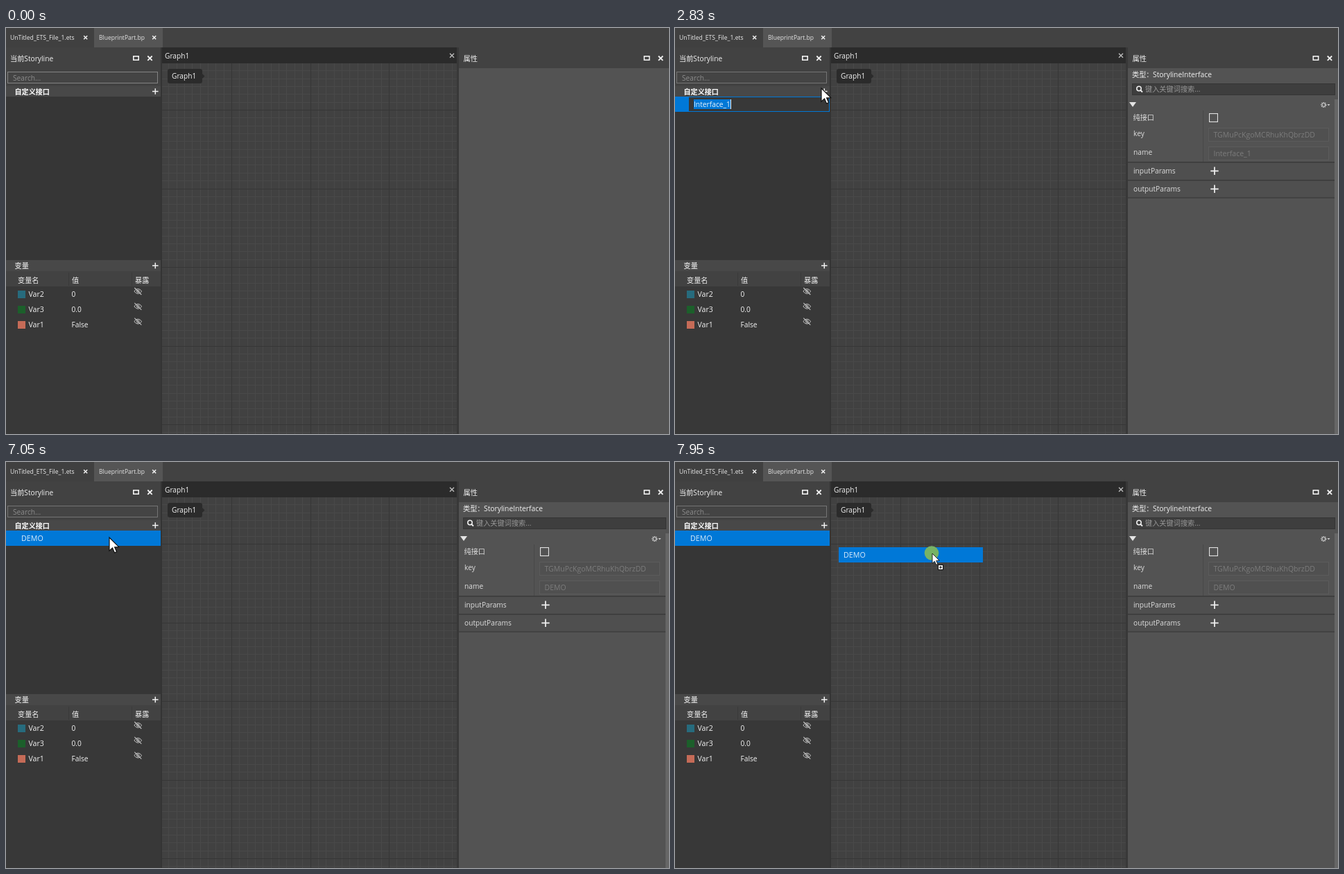
Animation of 956x586 px, one loop 8000 ms. Source, as an HTML page with a canvas:

```html
<!DOCTYPE html>
<html lang="zh">
<head>
<meta charset="utf-8">
<title>Interface editor</title>
<style>
html, body { margin: 0; width: 100%; height: 100%; overflow: hidden; background: #404040; }
canvas { display: block; width: 956px; height: 586px; }
</style>
</head>
<body>
<canvas id="stage" width="956" height="586"></canvas>
<script>
const ctx = document.getElementById('stage').getContext('2d');
const FAMILY = '"Open Sans", "Noto Sans CJK SC", "Noto Sans CJK", sans-serif';
const LOOP = 8000, STEP = 70;
const BLUE = '#0078d7', WHITE = '#f2f2f2';

function box(x, y, w, h, color) {
  ctx.fillStyle = color;
  ctx.fillRect(x, y, w, h);
}

function frame(x, y, w, h, color, line = 1) {
  ctx.strokeStyle = color;
  ctx.lineWidth = line;
  ctx.strokeRect(x + line / 2, y + line / 2, w - line, h - line);
}

function text(str, x, y, color = WHITE, size = 10.2, weight = 400) {
  ctx.font = `${weight} ${size}px ${FAMILY}`;
  ctx.fillStyle = color;
  ctx.fillText(str, x, y);
}

function lines(color, width, ...segments) {
  ctx.strokeStyle = color;
  ctx.lineWidth = width;
  ctx.beginPath();
  for (const [x1, y1, x2, y2] of segments) {
    ctx.moveTo(x1, y1);
    ctx.lineTo(x2, y2);
  }
  ctx.stroke();
}

function shape(points, color) {
  ctx.beginPath();
  points.forEach(([x, y]) => ctx.lineTo(x, y));
  ctx.closePath();
  ctx.fillStyle = color;
  ctx.fill();
}

function disc(x, y, r, color) {
  ctx.beginPath();
  ctx.arc(x, y, r, 0, Math.PI * 2);
  ctx.fillStyle = color;
  ctx.fill();
}

function cross(x, y, r, color = WHITE, width = 1.8) {
  lines(color, width, [x - r, y - r, x + r, y + r], [x - r, y + r, x + r, y - r]);
}

function plus(x, y, r, width = 1.5) {
  lines(WHITE, width, [x - r, y, x + r, y], [x, y - r, x, y + r]);
}

function windowButtons(x) {
  frame(x, 40, 9, 7, WHITE, 1.6);
  cross(x + 24.5, 43.7, 3.2);
}

function hiddenEye(x, y) {
  ctx.strokeStyle = '#c4c4c4';
  ctx.lineWidth = 1;
  ctx.beginPath();
  ctx.moveTo(x - 5.5, y);
  ctx.quadraticCurveTo(x, y - 7, x + 5.5, y);
  ctx.quadraticCurveTo(x, y + 7, x - 5.5, y);
  ctx.stroke();
  ctx.beginPath();
  ctx.arc(x, y, 1.8, 0, Math.PI * 2);
  ctx.stroke();
  lines('#c4c4c4', 1.1, [x - 5, y - 5, x + 5, y + 5]);
}

function drawTabs() {
  box(0, 0, 956, 586, '#424242');
  box(0, 0, 127, 28, '#404040');
  box(127, 0, 99, 28, '#555555');
  text('UnTitled_ETS_File_1.ets', 6, 17, '#ececec', 8.65);
  text('BlueprintPart.bp', 134, 17, '#e4e4e4', 8.55);
  cross(114.7, 13.7, 2.5, WHITE, 1.5);
  cross(213.7, 13.7, 2.5, WHITE, 1.5);
}

function drawLeft(focused) {
  box(0, 28, 223, 56, '#424242');
  text('当前Storyline', 6, 48, WHITE, 10.2);
  windowButtons(183);
  box(2, 63, 217, 17, '#444444');
  frame(2, 63, 217, 17, focused ? '#848484' : '#747474');
  text('Search...', 10, 75.5, '#8c8c8c');

  box(0, 84, 223, 15, '#484848');
  text('自定义接口', 12.5, 95.5, '#ffffff', 10.1, 700);
  plus(215.3, 91.5, 4.3);
  box(0, 99, 223, 236, '#363636');

  box(0, 335, 223, 16, '#484848');
  text('变量', 12.5, 347, '#ffffff', 10.2, 500);
  plus(215.3, 343, 4.3);
  box(0, 351, 223, 22, '#424242');
  box(90, 353, 1, 19, '#3a3a3a');
  box(181, 353, 1, 19, '#3a3a3a');
  text('变量名', 17, 368);
  text('值', 95, 368);
  text('暴露', 186, 368);
  box(0, 373, 223, 213, '#383838');
  const vars = [['Var2', '0', '#276b7d'], ['Var3', '0.0', '#1c5f2b'], ['Var1', 'False', '#c56b57']];
  vars.forEach(([name, value, color], i) => {
    const y = 384.3 + i * 21.8;
    box(17, Math.round(y) - 5, 11, 11, color);
    text(name, 32.5, y + 4, WHITE, 10.6);
    text(value, 94.5, y + 4);
    hiddenEye(190.3, y - 4.3);
  });
  box(223, 28, 2, 558, '#343434');
}

function drawGraph() {
  box(225, 28, 426, 23, '#2b2b2b');
  text('Graph1', 229, 44);
  cross(643, 39.7, 3, '#bdbdbd', 1.4);
  box(225, 51, 426, 535, '#414141');

  const cell = 11.35, first = [325.5, 118.5];
  for (const major of [false, true]) {
    const color = major ? '#363636' : '#494949';
    for (let i = -9; i < 42; i++) {
      if ((i % 10 === 0) !== major) continue;
      const x = Math.floor(first[0] + i * cell), y = Math.floor(first[1] + i * cell);
      if (x > 225 && x < 651) box(x, 51, 1, 535, color);
      if (y > 51 && y < 586) box(225, y, 426, 1, color);
    }
  }

  ctx.beginPath();
  ctx.roundRect(233, 59, 50, 21, 3);
  ctx.fillStyle = '#2b2b2b';
  ctx.fill();
  shape([[283, 66], [286.5, 69.5], [283, 73]], '#2b2b2b');
  text('Graph1', 239, 73);
  box(650, 28, 3, 558, '#383838');
}

function drawRight() {
  box(653, 28, 303, 30, '#424242');
  text('属性', 659.5, 48);
  windowButtons(919.5);
  box(653, 58, 303, 528, '#535353');
}

function field(y, value) {
  box(769, y, 174, 20, '#505050');
  frame(769, y, 174, 20, '#5b5b5b');
  text(value, 776.5, y + 14, '#7c7c7c', 10.5);
}

function drawProperties(name) {
  text('类型：', 659, 70.5);
  text('StorylineInterface', 689, 70.5, WHITE, 10.3);

  box(659, 80, 293, 17, '#3e3e3e');
  frame(659, 80, 293, 17, '#353535');
  ctx.strokeStyle = WHITE;
  ctx.lineWidth = 1.5;
  ctx.beginPath();
  ctx.arc(669, 87.5, 3.2, 0, Math.PI * 2);
  ctx.stroke();
  lines(WHITE, 1.8, [671.3, 89.8, 674, 92.5]);
  text('键入关键词搜索...', 678, 92.3, '#979797');

  shape([[655, 107], [665, 107], [660, 114]], '#e4e4e4');
  ctx.setLineDash([1.4, 1.1]);
  ctx.strokeStyle = '#d0d0d0';
  ctx.lineWidth = 1.4;
  ctx.beginPath();
  ctx.arc(935.3, 111, 3.4, 0, Math.PI * 2);
  ctx.stroke();
  ctx.setLineDash([]);
  ctx.lineWidth = 1;
  ctx.beginPath();
  ctx.arc(935.3, 111, 2.3, 0, Math.PI * 2);
  ctx.stroke();
  shape([[940.5, 110], [944.5, 110], [942.5, 112.3]], '#d0d0d0');

  box(761, 119, 1, 74, '#484848');
  text('纯接口', 660.5, 133, '#dddddd');
  text('key', 661, 156, '#dddddd');
  text('name', 661, 183, '#dddddd');
  frame(770, 123, 13, 13, '#e0e0e0', 1.1);
  field(144, 'TGMuPcKgoMCRhuKhQbrzDD');
  field(171, name);

  ['inputParams', 'outputParams'].forEach((label, i) => {
    const y = 193 + i * 26;
    box(653, y, 298, 26, '#4f4f4f');
    box(653, y, 298, 1.5, '#3a3a3a');
    text(label, 661, y + 16.5, '#dddddd');
    plus(778, y + 13.3, 5.7, 1.7);
  });
  box(653, 244.5, 298, 1.2, '#3a3a3a');
  box(951, 103, 5, 483, '#666666');
}

function typed(t) {
  const keys = [3300, 3500, 3700, 3770];
  return 'DEMO'.slice(0, keys.filter(k => t >= k).length);
}

function drawRow(t) {
  box(0, 99, 223, 22, BLUE);
  if (t >= 4170) {
    text('DEMO', 22, 114, '#d9ebfa', 10.7);
    return;
  }
  box(20, 100, 202, 20, '#383838');
  const entry = typed(t);
  if (entry) {
    text(entry, 27, 114, WHITE, 10.7);
    box(28 + Math.floor(ctx.measureText(entry).width), 103, 1, 14, WHITE);
  } else {
    box(27, 103, 53, 14, BLUE);
    text('Interface_1', 27, 114, '#e8f3fc', 10.25);
    if (t < 2300 || t >= 2830) box(80, 103, 1, 14, WHITE);
  }
}

function arrow(x, y, scale) {
  ctx.save();
  ctx.translate(x, y);
  ctx.scale(scale, scale);
  ctx.beginPath();
  [[0, 0], [0, 16.3], [3.8, 12.8], [6.4, 18.6], [9, 17.5], [6.5, 11.8], [11.6, 11.6]]
    .forEach(([px, py]) => ctx.lineTo(px, py));
  ctx.closePath();
  ctx.fillStyle = '#ffffff';
  ctx.strokeStyle = '#111111';
  ctx.lineWidth = 1;
  ctx.fill();
  ctx.stroke();
  ctx.restore();
}

const ease = p => p * p * (3 - 2 * p);

// Positions advance in whole steps, as in a screen recording.
function glide(t, start, count, from, to) {
  const p = Math.min(count, Math.max(0, Math.floor((t - start) / STEP))) / count;
  return from.map((v, i) => v + (to[i] - v) * ease(p));
}

const DRAG_X = [149, 156, 203, 283, 340, 369, 382, 385, 383, 377, 371];
const DRAG_Y = [109, 110, 117, 128, 134, 134, 134, 133, 133, 132, 132];

function pointer(t) {
  if (t < 6350) return glide(t, 460, 11, [451, 488], [211, 87]);
  if (t < 7250) return glide(t, 6350, 10, [211, 87], [149, 109]);
  const i = Math.min(10, Math.floor((t - 7250) / STEP));
  return [DRAG_X[i], DRAG_Y[i]];
}

function drawPointer(t) {
  if (t < 460) return;
  const [x, y] = pointer(t).map(Math.round);
  const dragging = t >= 7390;
  if (dragging) {
    box(x - 135, y - 9, 208, 22, BLUE);
    text('DEMO', x - 128, y + 6, '#d9ebfa', 10.7);
  }
  if ((t >= 1630 && t < 1770) || t >= 7250) disc(x - 1, y - 0.5, 10.3, '#77b365');
  arrow(x, y, dragging ? 0.88 : 1.18);
  if (dragging) {
    box(x + 8, y + 16, 8, 8, '#ffffff');
    frame(x + 8, y + 16, 8, 8, '#111111');
    lines('#111111', 1, [x + 10, y + 20, x + 14, y + 20], [x + 12, y + 18, x + 12, y + 22]);
  }
}

function draw(now) {
  const t = now % LOOP;
  const created = t >= 1700;
  drawTabs();
  drawLeft(!created);
  drawGraph();
  drawRight();
  if (created) {
    drawRow(t);
    drawProperties(t >= 4170 ? 'DEMO' : 'Interface_1');
  }
  drawPointer(t);
}

let start;
function tick(now) {
  start ??= now;
  draw(now - start);
  requestAnimationFrame(tick);
}
draw(0);
requestAnimationFrame(tick);
</script>
</body>
</html>
```
